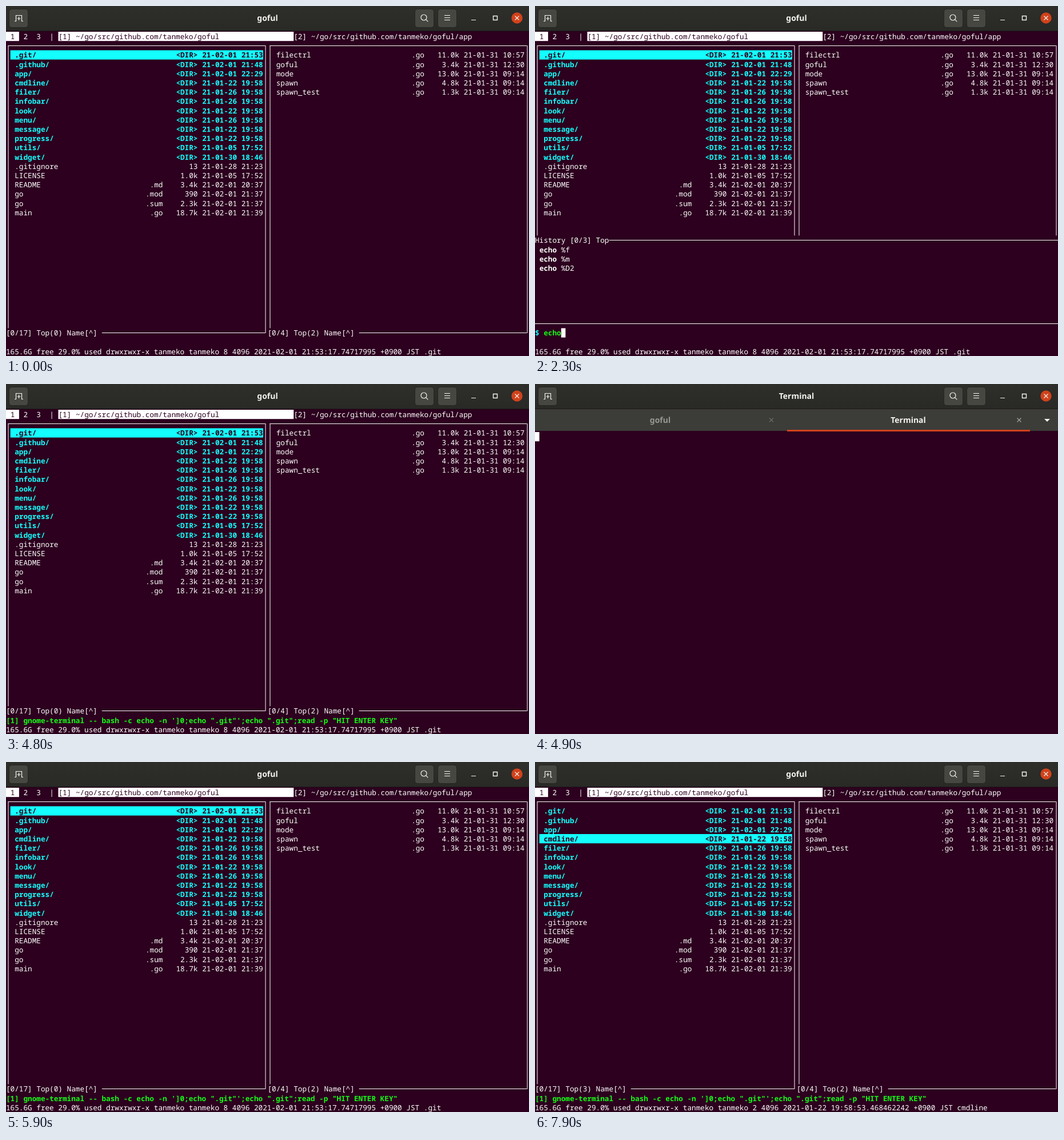
An HTML page that plays this animation: 915 by 612 pixels, repeating every 8000 ms.

```html
<!DOCTYPE html>
<html lang="en">
<head>
<meta charset="utf-8">
<title>goful</title>
<style>
  html, body { margin: 0; width: 100%; height: 100%; overflow: hidden; background: #2c001e; }
  svg { display: block; width: 915px; height: 612px; }
  text { white-space: pre; text-rendering: geometricPrecision; }
  .mono { font: 12.7083px "Noto Sans Mono", monospace; }
  .title { font: bold 14px "Noto Sans", sans-serif; text-anchor: middle; }
  .bold { font-weight: bold; }
</style>
</head>
<body>
<svg id="stage" viewBox="0 0 915 612"></svg>
<script>
const LOOP = 8000;
const CELL = 7.625, LINE = 16.2, TOP = 45;
const BG = '#2c001e', FG = '#ffffff', CYAN = '#14fefe', GREEN = '#16fb16',
      PURPLE = '#7d0a78', ORANGE = '#d0421b', LIGHT = '#f4f3f0';
const USER = 'tanmeko';

const leftFiles = [
  ['.git/', '', '<DIR>', '21-02-01 21:53'],
  ['.github/', '', '<DIR>', '21-02-01 21:48'],
  ['app/', '', '<DIR>', '21-02-01 22:29'],
  ['cmdline/', '', '<DIR>', '21-01-22 19:58'],
  ['filer/', '', '<DIR>', '21-01-26 19:58'],
  ['infobar/', '', '<DIR>', '21-01-26 19:58'],
  ['look/', '', '<DIR>', '21-01-22 19:58'],
  ['menu/', '', '<DIR>', '21-01-26 19:58'],
  ['message/', '', '<DIR>', '21-01-22 19:58'],
  ['progress/', '', '<DIR>', '21-01-22 19:58'],
  ['utils/', '', '<DIR>', '21-01-05 17:52'],
  ['widget/', '', '<DIR>', '21-01-30 18:46'],
  ['.gitignore', '', '13', '21-01-28 21:23'],
  ['LICENSE', '', '1.0k', '21-01-05 17:52'],
  ['README', '.md', '3.4k', '21-02-01 20:37'],
  ['go', '.mod', '390', '21-02-01 21:37'],
  ['go', '.sum', '2.3k', '21-02-01 21:37'],
  ['main', '.go', '18.7k', '21-02-01 21:39'],
];
const rightFiles = [
  ['filectrl', '.go', '11.0k', '21-01-31 10:57'],
  ['goful', '.go', '3.4k', '21-01-31 12:30'],
  ['mode', '.go', '13.0k', '21-01-31 09:14'],
  ['spawn', '.go', '4.8k', '21-01-31 09:14'],
  ['spawn_test', '.go', '1.3k', '21-01-31 09:14'],
];
// Mode, link count and modification time for the entries the cursor visits
const details = [
  ['drwxrwxr-x', 8, '2021-02-01 21:53:17.74717995'],
  ['drwxr-xr-x', 3, '2021-02-01 21:48:24.757356553'],
  ['drwxrwxr-x', 2, '2021-02-01 22:29:41.360281734'],
  ['drwxrwxr-x', 2, '2021-01-22 19:58:53.468462242'],
];
const message = `[1] gnome-terminal -- bash -c echo -n ']0;echo ".git"';echo ".git";read -p "HIT ENTER KEY"`;

const escapeText = s => s.replace(/&/g, '&amp;').replace(/</g, '&lt;');
const rect = (x, y, w, h, fill, r = 0) =>
  `<rect x="${x}" y="${y}" width="${w}" height="${h}" rx="${r}" fill="${fill}"/>`;
const stroke = (d, color = LIGHT, width = 1.2) =>
  `<path d="${d}" fill="none" stroke="${color}" stroke-width="${width}"/>`;
const label = (x, y, s, fill) =>
  `<text class="title" x="${x}" y="${y}" fill="${fill}">${escapeText(s)}</text>`;
const cross = (x, y, r, color) =>
  stroke(`M${x - r} ${y - r}l${2 * r} ${2 * r}m0 ${-2 * r}l${-2 * r} ${2 * r}`, color);

// Terminal-grid helpers
const put = (col, row, s, fill = FG, bold = false, top = TOP) =>
  `<text class="mono${bold ? ' bold' : ''}" x="${col * CELL}" y="${top + row * LINE + 13}" fill="${fill}">${escapeText(s)}</text>`;
const block = (col, row, cols, fill = FG, top = TOP) =>
  rect(col * CELL, top + row * LINE, cols * CELL, LINE, fill);
const hline = (from, to, row) =>
  rect(from * CELL, Math.floor(TOP + (row + .5) * LINE), (to - from) * CELL, 1, FG);
const vline = (col, endY) => {
  const y = TOP + 1.5 * LINE;
  return rect(Math.floor((col + .5) * CELL) + .5, Math.floor(y), 1, endY - Math.floor(y), FG);
};

function headerBar(title) {
  const button = x => rect(x - .5, 5.5, 33, 32, '#20201d', 4) + rect(x, 6, 32, 31, '#474742', 4);
  return rect(0, 0, 915, 43, 'url(#bar)') + rect(0, 43, 915, 1, '#1d1b19') +
    button(6) + button(716) + button(756) +
    stroke('M15 26.5h2.5v-10h10v10h2.5M22.5 19v6M19.5 22h6') +
    '<circle cx="731" cy="20" r="5" fill="none" stroke="#f4f3f0" stroke-width="1.2"/>' +
    stroke('M734.7 23.7l3.6 3.6M767 16.5h10M767 20.5h10M767 24.5h10M814 24.5h8') +
    stroke('M852.5 17.5h7v7h-7z', LIGHT, 1.4) +
    `<circle cx="894" cy="21" r="9.7" fill="${ORANGE}"/>` + cross(894, 21, 3.5, LIGHT) +
    label(457.5, 25.5, title, LIGHT);
}

function pane(col, files, footer, selected, panelOpen) {
  const bottom = TOP + (panelOpen ? 22 : 32) * LINE;
  const corner = Math.floor(TOP + 32.5 * LINE) + 1;
  let out = hline(col + .5, col + 59.5, 1) + vline(col, bottom) +
    vline(col + 59, panelOpen ? bottom : corner);
  files.forEach(([name, ext, size, date], i) => {
    const row = i + 2, isDir = size === '<DIR>', current = i === selected;
    const color = current ? BG : isDir ? CYAN : FG;
    if (current) out += block(col + 1, row, 58, CYAN);
    out += put(col + 2, row, name, color, isDir) +
      put(col + 36 - ext.length, row, ext, color, isDir) +
      put(col + 44 - size.length, row, size, color, isDir) +
      put(col + 45, row, date, color, isDir);
  });
  if (!panelOpen)
    out += put(col, 32, footer) + hline(col + footer.length + 1, col + 59.5, 32);
  return out;
}

function commandPanel(t) {
  const picked = t >= 3000;
  const header = `History [${picked ? 1 : 0}/3] Top`;
  let out = put(0, 22, header) + hline(header.length, 120, 22) + hline(0, 120, 31);
  ['%f', '%m', '%D2'].forEach((arg, i) => {
    const current = picked && i === 0, color = current ? BG : FG;
    if (current) out += block(1, 23, 118);
    out += put(1, 23 + i, 'echo', color, true) + put(6, 23 + i, arg, color);
  });
  const typed = 'echo'.slice(0, [1500, 1600, 2100, 2200].filter(at => t >= at).length);
  out += put(0, 32, '$', CYAN, true) + put(2, 32, typed, GREEN, true);
  if (picked) out += put(7, 32, '%f', PURPLE, true);
  if (t < 3600 || t >= 4200) out += block(picked ? 9 : 2 + typed.length, 32, 1);
  return out;
}

function fileManager(t) {
  const selected = [7200, 7500, 7900].filter(at => t >= at).length;
  const panelOpen = t >= 1000 && t < 4800;
  const [mode, links, time] = details[selected];
  const name = leftFiles[selected][0].replace('/', '');
  const path = `~/go/src/github.com/${USER}/goful`;
  return headerBar('goful') +
    block(0, 0, 3) + block(12, 0, 54) +
    put(1, 0, '1', BG) + put(4, 0, '2  3  |') +
    put(12, 0, `[1] ${path}`, BG) + put(66, 0, `[2] ${path}/app`) +
    pane(0, leftFiles, `[0/17] Top(${selected}) Name[^]`, selected, panelOpen) +
    pane(60, rightFiles, '[0/4] Top(2) Name[^]', -1, panelOpen) +
    (panelOpen ? commandPanel(t) : '') +
    (t >= 4800 ? put(0, 33, message, GREEN, true) : '') +
    put(0, 34, `165.6G free 29.0% used ${mode} ${USER} ${USER} ${links} 4096 ${time} +0900 JST ${name}`);
}

function shellTab(t) {
  const top = 84, ready = t >= 5000;
  const title = ready ? 'echo ".git"' : 'Terminal';
  const cursorOn = t < 5500 || t >= 5800;
  return headerBar(title) + rect(0, 44, 915, 38, '#3c3c38') +
    rect(441, 80, 425, 3, ORANGE) +
    label(219, 67.5, 'goful', '#989793') + cross(413.5, 63, 3.5, '#6c6b67') +
    label(653, 67.5, title, LIGHT) + cross(847, 63, 3.5, '#a4a39f') +
    `<path d="M891 61h10l-5 5z" fill="${LIGHT}"/>` +
    (ready ? put(0, 0, '.git', FG, false, top) + put(0, 1, 'HIT ENTER KEY', FG, false, top) : '') +
    (cursorOn ? block(ready ? 13 : 0, ready ? 1 : 0, 1, FG, top) : '');
}

const stage = document.getElementById('stage');
const defs = '<defs><linearGradient id="bar" x2="0" y2="1">' +
  '<stop stop-color="#2e2e2b"/><stop offset="1" stop-color="#292926"/></linearGradient></defs>';
let shown = '';

function draw() {
  const t = performance.now() % LOOP;
  const inShell = t >= 4900 && t < 5900;
  const picture = defs + rect(0, 0, 915, 612, BG) + (inShell ? shellTab(t) : fileManager(t));
  if (picture !== shown) stage.innerHTML = shown = picture;
  requestAnimationFrame(draw);
}
draw();
</script>
</body>
</html>
```
